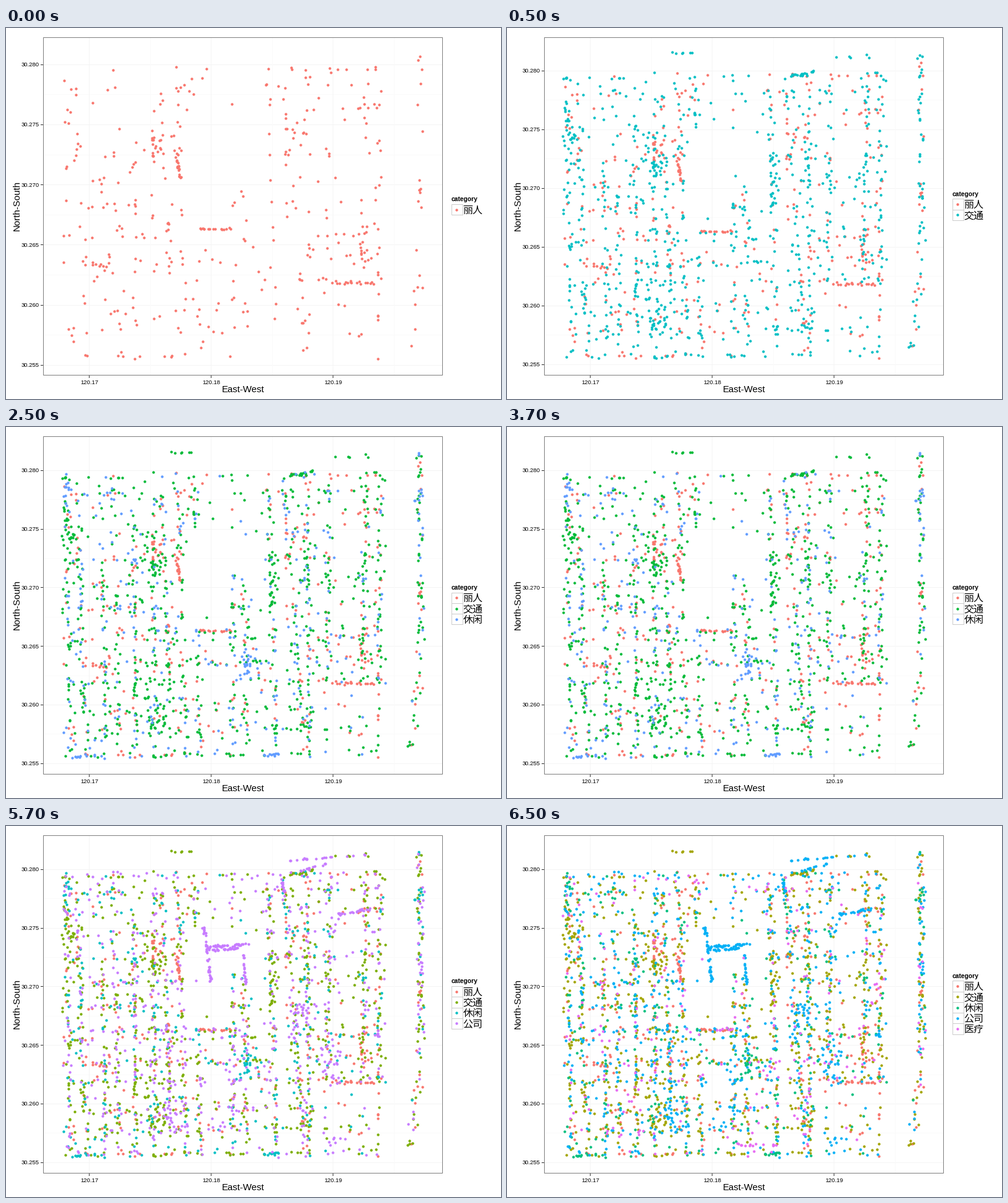
A matplotlib script for the animation above (8 s loop, 800 by 600 pixels).

```python
import numpy as np
import matplotlib.pyplot as plt
from matplotlib.animation import FuncAnimation
from matplotlib.patches import Rectangle

W, H, DPI = 800, 600, 100
PX = 72 / DPI
LEFT, RIGHT, TOP, BOTTOM = 60.5, 705.5, 14.5, 560.5
LEGEND_X, LEGEND_MID, KEY = 720.5, 293.3, 17.28

# Pixel row of latitude 30.280 for each number of categories.
LAT_TOP = [58.5, 68.5, 69.5, 69.5, 69.5]
LAT_BOTTOM = [544.5, 543.5, 543.5, 543.5, 543.5]
PALETTES = [
    ["#F8766D"],
    ["#F8766D", "#00BFC4"],
    ["#F8766D", "#00BA38", "#619CFF"],
    ["#F8766D", "#7CAE00", "#00BFC4", "#C77CFF"],
    ["#F8766D", "#A3A500", "#00BF7D", "#00B0F6", "#E76BF3"],
]

# The town: avenues lean from a northern to a southern x, cross streets
# tilt slightly, and quiet quarters reject most places.
NORTH, SOUTH, WEST, EAST = 72, 535, 91, 612
AVENUES = [(95, 104), (113, 130), (150, 162), (172, 184), (206, 210), (241, 237),
           (252, 268), (276, 292), (303, 314), (365, 367), (378, 390), (424, 437),
           (446, 484), (484, 490), (523, 516), (583, 573), (604, 600)]
CROSS_STREETS = [78, 105, 138, 172, 213, 250, 290, 328, 342, 381, 410, 457, 490, 528]
QUIET = [  # x0, y0, x1, y1, share rejected
    (290, 165, 422, 238, 0.85), (288, 238, 362, 325, 0.85), (396, 230, 424, 330, 0.8),
    (318, 395, 360, 445, 0.7), (440, 125, 452, 535, 0.9), (495, 420, 612, 535, 0.6),
    (310, 70, 415, 165, 0.5), (532, 170, 572, 250, 0.6), (110, 70, 300, 165, 0.4),
]

# Per category: label, places in town, hubs (x, y), busy strips (x0, y0, x1, y1, n).
CATEGORIES = [
    ("丽人", 395, [(243, 202), (154, 388), (574, 354), (468, 185)],
     [(527, 414, 600, 414, 18), (314, 329, 362, 329, 14), (272, 205, 283, 250, 16)]),
    ("交通", 900, [(240, 228), (242, 470), (100, 170), (432, 255)],
     [(255, 42, 308, 41, 6), (523, 49, 585, 46, 5), (470, 78, 508, 66, 12)]),
    ("休闲", 400, [(245, 460), (490, 235), (392, 383), (100, 100)],
     [(105, 535, 155, 529, 9), (415, 530, 437, 529, 8)]),
    ("公司", 710, [(520, 375), (268, 460), (530, 520), (475, 300)],
     [(324, 196, 395, 190, 34), (326, 201, 375, 197, 22), (319, 162, 331, 250, 36),
      (383, 205, 388, 255, 14), (444, 85, 452, 115, 14), (458, 55, 587, 46, 18),
      (476, 72, 517, 60, 14), (535, 142, 592, 134, 18)]),
    ("医疗", 250, [(420, 390), (205, 428), (481, 440), (605, 240)],
     [(372, 515, 436, 515, 14), (330, 330, 365, 328, 7)]),
]


def town_candidates(rng, n, hubs):
    """Places along avenues, cross streets, around hubs and in between."""
    x, y = rng.uniform(WEST, EAST, n), rng.uniform(NORTH, SOUTH, n)
    kind = rng.choice(4, n, p=[0.44, 0.26, 0.10, 0.20])
    north, south = np.array(AVENUES)[rng.integers(len(AVENUES), size=n)].T
    avenue_x = north + (south - north) * (y - NORTH) / (SOUTH - NORTH)
    street_y = rng.choice(CROSS_STREETS, n) - 0.015 * (x - 350)
    hub_x, hub_y = np.array(hubs)[rng.integers(len(hubs), size=n)].T
    x = np.choose(kind, [avenue_x, x, hub_x + rng.normal(0, 10, n), x])
    y = np.choose(kind, [y, street_y, hub_y + rng.normal(0, 16, n), y])
    return x + rng.normal(0, 2.5, n), y + rng.normal(0, 2.5, n)


def make_town(rng, n, hubs):
    x, y = town_candidates(rng, 5 * n, hubs)
    keep = (x > WEST - 2) & (x < EAST + 2) & (y > NORTH) & (y < SOUTH + 1)
    for x0, y0, x1, y1, rejected in QUIET:
        inside = (x > x0) & (x < x1) & (y > y0) & (y < y1)
        keep &= ~inside | (rng.random(5 * n) > rejected)
    return x[keep][:n], y[keep][:n]


def make_strip(rng, x0, y0, x1, y1, n):
    t = rng.uniform(0, 1, n)
    noise = rng.normal(0, 1, (2, n))
    return x0 + (x1 - x0) * t + noise[0], y0 + (y1 - y0) * t + noise[1]


def make_river_road(rng, n):
    """The separate road along the eastern edge bends west in the south."""
    y = rng.uniform(42, 520, n)
    x = 669 - 0.13 * np.maximum(y - 390, 0) + rng.normal(0, 3.5, n)
    return np.minimum(x, 676), y


def make_places(index):
    """Return x in pixels and y as a fraction between the outer latitudes."""
    rng = np.random.default_rng(20 + index)
    _, n, hubs, strips = CATEGORIES[index]
    parts = [make_town(rng, n, hubs), make_river_road(rng, n // 18)]
    parts += [make_strip(rng, *strip) for strip in strips]
    x, y = np.hstack(parts)
    return x, (y - LAT_TOP[-1]) / (LAT_BOTTOM[-1] - LAT_TOP[-1])


places = [make_places(i) for i in range(len(CATEGORIES))]

fig = plt.figure(figsize=(W / DPI, H / DPI), dpi=DPI, facecolor="white")
ax = fig.add_axes([0, 0, 1, 1])


def line(x0, y0, x1, y1, color):
    ax.plot([x0, x1], [y0, y1], color=color, lw=PX, zorder=1)


def label(x, y, text, size, font="Liberation Sans", **kw):
    ax.text(x, y, text, fontsize=size * PX, family=font, va="baseline", **kw)


def box(x, y, w, h, edge):
    ax.add_patch(Rectangle((x, y), w, h, fc="none", ec=edge, lw=PX, zorder=4))


def dots(x, y, color):
    ax.scatter(x, y, s=(4.3 * PX) ** 2, c=color, lw=0, antialiased=False, zorder=3)


def draw_axes(top, bottom):
    step = (bottom - top) / 5
    for i in range(6):
        y = top + i * step
        if i < 5:
            line(LEFT, y + step / 2, RIGHT, y + step / 2, "#FAFAFA")
        line(LEFT, y, RIGHT, y, "#F4F4F4")
        line(56, y, LEFT, y, "#333333")
        label(53.5, y + 3.5, f"{30.28 - 0.005 * i:.3f}", 9.5, ha="right")
    for i in range(3):
        x = 134.5 + 197 * i
        line(x + 98.5, TOP, x + 98.5, BOTTOM, "#FAFAFA")
        line(x, TOP, x, BOTTOM, "#F4F4F4")
        line(x, BOTTOM, x, BOTTOM + 4, "#333333")
        label(x + 0.5, 575.5, f"{120.17 + 0.01 * i:.2f}", 9.5, ha="center")
    box(LEFT, TOP, RIGHT - LEFT, BOTTOM - TOP, "#7F7F7F")
    label(383, 589, "East-West", 15, ha="center")
    label(22, 287.5, "North-South", 15, ha="center", rotation=90,
          rotation_mode="anchor")


def draw_legend(palette):
    top = LEGEND_MID - KEY * len(palette) / 2
    label(LEGEND_X - 0.5, top - 4.5, "category", 10.3, weight="bold")
    for i, color in enumerate(palette):
        y = top + i * KEY
        box(LEGEND_X, y, KEY, KEY, "#CCCCCC")
        dots([LEGEND_X + KEY / 2 - 0.5], [y + KEY / 2], color)
        label(738.5, y + KEY / 2 + 6, CATEGORIES[i][0], 16, "Noto Sans CJK JP")


def update(frame):
    stage = (frame + 3) // 4
    top, bottom, palette = LAT_TOP[stage], LAT_BOTTOM[stage], PALETTES[stage]
    ax.clear()
    # The quarter-pixel shift makes line centres snap to the intended pixel.
    ax.set(xlim=(0.25, W + 0.25), ylim=(H - 0.25, -0.25))
    ax.axis("off")
    draw_axes(top, bottom)
    for (x, fraction), color in zip(places, palette):
        dots(x, top + fraction * (bottom - top), color)
    draw_legend(palette)
    return []


animation = FuncAnimation(fig, update, frames=16, interval=500, repeat=True,
                          repeat_delay=0, blit=False)
plt.show()
```
